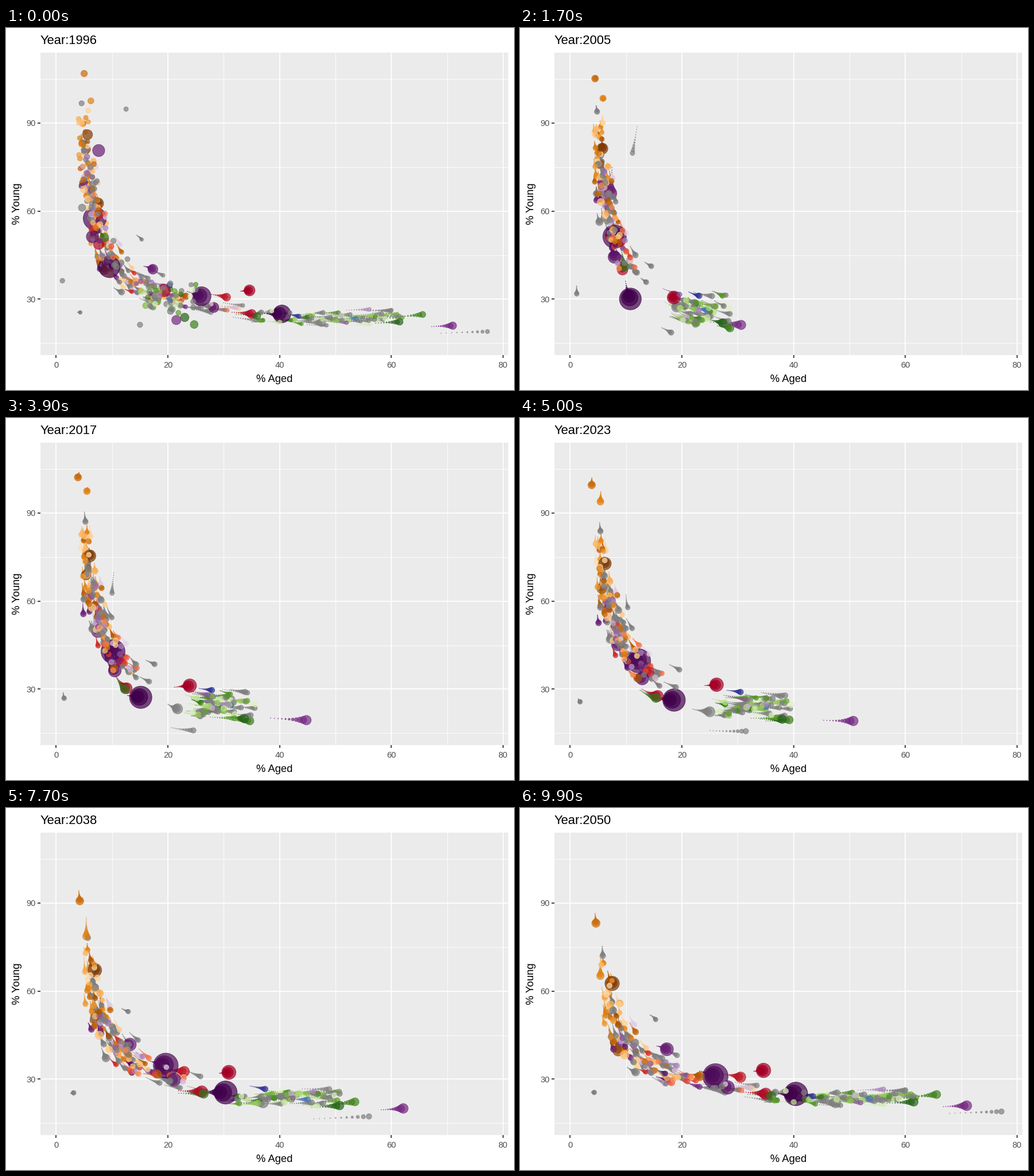
A matplotlib script that plays this animation: 885x632 px, repeating every 10000 ms.

```python
import numpy as np
import matplotlib.pyplot as plt
from matplotlib.animation import FuncAnimation
from matplotlib.colors import LinearSegmentedColormap

W, H, DPI = 885, 632, 120
FRAMES, WAKE = 100, 10
YEARS = np.linspace(1996, 2050, FRAMES)
U = np.linspace(0, 1, FRAMES)

plt.rcParams["font.family"] = "Liberation Sans"
rng = np.random.default_rng(12)


def ramp(*hexes):
    return LinearSegmentedColormap.from_list("ramp", ["#" + h for h in hexes])


RAMPS = {
    "africa": ramp("7F3B08", "B35806", "E08214", "FDB863", "FEE0B6"),
    "americas": ramp("A50026", "D73027", "F46D43", "FDAE61", "FEE090"),
    "asia": ramp("40004B", "762A83", "9970AB", "C2A5CF", "E7D4E8"),
    "europe": ramp("276419", "4D9221", "7FBC41", "B8E186", "E6F5D0"),
    "oceania": ramp("313695", "4575B4"),
    "other": ramp("7F7F7F", "7F7F7F"),
}
tracks = []


def glide(vals):
    """Smooth curve through the values at the key years."""
    k = np.array([1996, 2005, 2017, 2050] if len(vals) == 4
                 else [1996, 2017, 2050], float)
    v = np.array(vals, float)
    m = np.gradient(v, k)
    i = np.clip(np.searchsorted(k, YEARS, "right") - 1, 0, len(k) - 2)
    h = k[i + 1] - k[i]
    u = (YEARS - k[i]) / h
    return ((2 * u**3 - 3 * u**2 + 1) * v[i] + (u**3 - 2 * u**2 + u) * h * m[i]
            + (3 * u**2 - 2 * u**3) * v[i + 1] + (u**3 - u**2) * h * m[i + 1])


def add(region, shade, pop, growth, x, y):
    people = pop * (1 / growth + (1 - 1 / growth) * U)
    radius = 4 + 18.5 * np.sqrt(people / 1650)
    tracks.append((RAMPS[region](float(shade)), x, y, radius))


def add_known(region, darkest, growth, *rows):
    """Rows: final population (millions), % aged, % young."""
    for shade, (pop, x, y) in zip(np.linspace(0, darkest, len(rows)), rows):
        add(region, shade, pop, growth, glide(x), glide(y))


def wobble(size):
    return size * np.sin(2 * np.pi * (U * rng.uniform(.5, 1.3) + rng.random()))


def add_stages(region, count, start, gain, shades, growth):
    """Countries moving along the usual path from young to aged."""
    for shade in np.linspace(*shades, count):
        s = rng.uniform(*start) + rng.uniform(*gain) * U**1.1
        base = 4.1 + .4 * np.exp(.45 * s)
        x = base * rng.lognormal(0, .12) + wobble(.25)
        y = (20 + 178 / (base - 2.3)) * rng.normal(1, .05) + wobble(1.2)
        add(region, shade, rng.lognormal(1.9, .9), growth, x, y)


def add_aged(region, count, shades):
    """Countries that are already old and grow older still."""
    for shade in np.linspace(*shades, count):
        x0, x1 = rng.uniform(15, 25), rng.uniform(36, 62)
        y0, y1 = rng.uniform(25, 36), rng.uniform(21.5, 26)
        x = x0 + (x1 - x0) * U**1.2
        y = y0 + (y1 - y0) * U - rng.uniform(2, 5) * np.sin(np.pi * np.sqrt(U))
        add(region, shade, rng.lognormal(1.6, .9), 1, x, y + wobble(.7))


add_known("asia", .25, 1.25,
          (1400, (9.5, 10.7, 15, 40.4), (41, 30.3, 27.3, 25)),
          (1660, (6.9, 7.9, 10.1, 26), (57.5, 51.5, 43, 31)),
          (320, (6.5, 10.4, 28.2), (51.3, 36.5, 27.2)),
          (300, (7.6, 7.4, 17.3), (80.6, 50, 40.2)),
          (125, (21.5, 30.3, 44.5, 71), (22.9, 21.3, 19.5, 21)))
add_known("africa", .5, 3,
          (400, (5.6, 6, 7.5), (86, 75.5, 62.6)),
          (190, (5.4, 5.3, 8.6), (81, 69, 39.8)),
          (85, (7.6, 10.3, 23.2), (60, 37.2, 31)),
          (66, (5, 3.9, 4.6), (106.8, 102.2, 83.1)),
          (45, (6.2, 5.5, 5.4), (97.5, 97.5, 65.2)))
add_known("americas", .12, 1.45,
          (400, (19.3, 18.5, 23.8, 34.6), (33, 30.6, 31.2, 33)),
          (215, (7.6, 12.5, 35), (48.7, 30.5, 25)),
          (150, (7.6, 11.5, 30.5), (58.8, 39.2, 30.7)))
add_known("europe", .16, 1.1,
          (80, (23, 33.5, 61.5), (23.8, 20, 22.3)),
          (95, (8.6, 12.2, 36), (51, 30.2, 24.3)),
          (60, (24.7, 34.5, 65.6), (21.4, 19.2, 24.8)))
add_known("other", 0, 1,
          (140, (18, 21.6, 47.5), (31, 23.4, 22)),
          (1, (12.5, 10, 15.3), (94.7, 63, 50.3)),
          (2, (1.1, 1.4, 4.3), (36.3, 27, 25.5)),
          (7, (15, 24.3, 77.2), (21.3, 16, 19)))

add_stages("africa", 39, (.9, 3.6), (2, 3.3), (.2, 1), 2.5)
add_stages("africa", 8, (3.6, 4.6), (2.5, 4.2), (.15, .9), 1.6)
add_stages("asia", 26, (2.6, 5.5), (2.6, 4.2), (.1, 1), 1.6)
add_stages("americas", 18, (3.4, 5.8), (2.4, 4), (.22, 1), 1.4)
add_stages("other", 16, (1, 3.5), (2.2, 4), (0, 1), 2)
add_stages("other", 26, (3.6, 6.4), (2.5, 4), (0, 1), 1.3)
add_aged("europe", 26, (.1, 1))
add_aged("asia", 3, (.4, .8))
add_aged("oceania", 2, (0, 1))
add_aged("other", 23, (0, 1))

# The two giants lie beneath all others
order = np.r_[0, 1, 2 + rng.permutation(len(tracks) - 2)]
colors = np.array([tracks[i][0] for i in order])
colors[:, 3] = .7
X, Y, R = (np.array([tracks[i][k] for i in order]).T for k in (1, 2, 3))

fig = plt.figure(figsize=(W / DPI, H / DPI), dpi=DPI, facecolor="white")
ax = fig.add_axes([60 / W, 61 / H, 815 / W, 528 / H], facecolor="#EBEBEB")
ax.set(xlim=(-2.826, 80.93), ylim=(10.99, 113.92))
ax.set_xticks(range(0, 81, 20))
ax.set_xticks(range(10, 80, 20), minor=True)
ax.set_yticks(range(30, 91, 30))
ax.set_yticks(range(15, 106, 30), minor=True)
ax.set_axisbelow(True)
ax.grid(which="major", color="white", lw=1.07)
ax.grid(which="minor", color="white", lw=.53)
ax.tick_params(which="minor", length=0)
ax.tick_params(which="major", length=2.75, width=1.07, color="#333333",
               labelcolor="#4D4D4D", labelsize=8.8)
ax.tick_params(axis="x", pad=3.6)
ax.tick_params(axis="y", pad=2)
ax.spines[:].set_visible(False)

title = fig.text(60 / W, 1 - 28 / H, "", fontsize=13.2)
fig.text(467.5 / W, 1 - 617.5 / H, "% Aged", fontsize=11, ha="center")
fig.text(20 / W, 1 - 307 / H, "% Young", fontsize=11, rotation=90,
         ha="center", va="center")

blank = np.zeros(len(colors) * (WAKE + 1))
dots = ax.scatter(blank, blank, s=1, c=np.tile(colors, (WAKE + 1, 1)),
                  edgecolors="face", linewidths=.6, zorder=3)
falloff = (np.arange(1, WAKE + 2) / (WAKE + 1))[:, None] ** 3


def draw(i):
    past = np.arange(i - WAKE, i + 1) % FRAMES
    radius = .85 + (R[past] - .85) * falloff
    dots.set_offsets(np.c_[X[past].ravel(), Y[past].ravel()])
    dots.set_sizes((2 * (radius.ravel() - .5) * 72 / DPI) ** 2)
    title.set_text(f"Year:{round(YEARS[i])}")
    return dots, title


anim = FuncAnimation(fig, draw, frames=FRAMES, interval=100, repeat=True,
                     repeat_delay=0)
plt.show()
```
